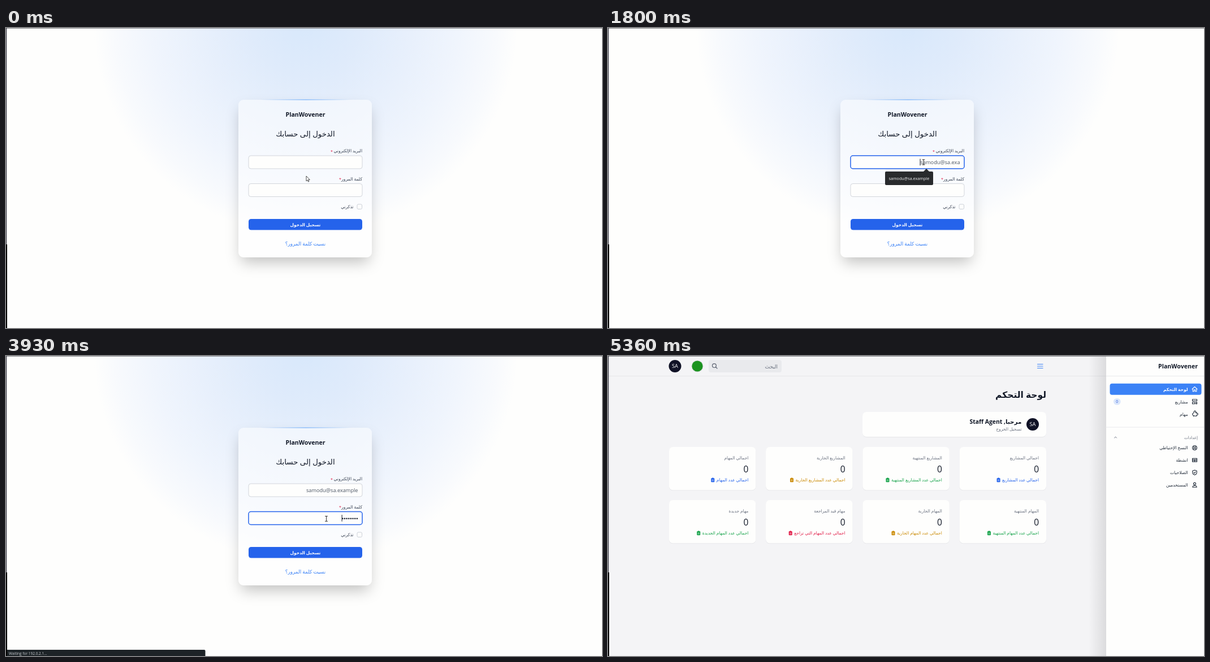
Animation, 1054 px wide and 531 px high, one loop 5.43 s. Source, as an HTML page:

```html
<!DOCTYPE html>
<html lang="ar">
<head>
<meta charset="utf-8">
<title>Sign in</title>
<style>
  html, body { margin: 0; width: 100%; height: 100%; overflow: hidden; background: #fefefd; }
  body {
    position: relative;
    background-image: radial-gradient(circle 375px at 530px -8px,
      #d8e8fb, #dfebfb 25%, #e8f0fc 50%, #f0f5fd 72%, #f8fafd 90%, #fefefd);
  }
  .card {
    position: absolute; left: 411px; top: 127px; width: 236px; height: 279px; border-radius: 9px;
    background: rgba(255, 255, 255, .5); box-shadow: 0 13px 27px -5px rgba(0, 0, 0, .25);
  }
  svg { position: absolute; left: 0; top: 0; display: block; }
  text { font-family: "Open Sans", "DejaVu Sans", sans-serif; white-space: pre; }
  .line { fill: none; stroke-linecap: round; stroke-linejoin: round; }
</style>
</head>
<body>
<div class="card"></div>
<svg id="stage" width="1054" height="531" viewBox="0 0 1054 531">
  <defs>
    <linearGradient id="glow">
      <stop offset="0" stop-color="#60a5fa" stop-opacity="0"/>
      <stop offset=".5" stop-color="#60a5fa"/>
      <stop offset="1" stop-color="#60a5fa" stop-opacity="0"/>
    </linearGradient>
    <linearGradient id="shade">
      <stop offset="0" stop-color="#000" stop-opacity="0"/>
      <stop offset="1" stop-color="#000" stop-opacity=".1"/>
    </linearGradient>
  </defs>
</svg>
<script>
const LOOP = 5430;
const INK = '#111827', GRAY = '#6b7280', BLUE = '#2563eb', SKY = '#3b82f6', WHITE = '#fefefd';
const GREEN = '#16a34a', AMBER = '#ca8a04', RED = '#e11d48';
const BRAND = 'PlanWovener', EMAIL = 'samodu@sa.example';
const stage = document.getElementById('stage');

function add(parent, tag, attrs = {}) {
  const el = document.createElementNS('http://www.w3.org/2000/svg', tag);
  for (const key in attrs) el.setAttribute(key, attrs[key]);
  return parent.appendChild(el);
}
const group = (parent, attrs) => add(parent, 'g', attrs);
const rect = (parent, x, y, width, height, rx, fill, extra) =>
  add(parent, 'rect', { x, y, width, height, rx, fill, ...extra });
const circle = (parent, cx, cy, r, fill) => add(parent, 'circle', { cx, cy, r, fill });
const line = (parent, d, stroke, width = 1, extra) =>
  add(parent, 'path', { d, stroke, 'stroke-width': width, class: 'line', ...extra });

// align is the visual side that x marks: left, middle or right
function text(parent, str, x, y, size, fill, align = 'right', weight = 400) {
  const rtl = /[\u0600-\u06ff]/.test(str);
  const anchor = align === 'middle' ? align : (align === 'right') === rtl ? 'start' : 'end';
  const el = add(parent, 'text', {
    x, y, fill, 'font-size': size, 'font-weight': weight,
    direction: rtl ? 'rtl' : 'ltr', 'text-anchor': anchor
  });
  el.textContent = str;
  return el;
}
const show = (el, on) => el.setAttribute('visibility', on ? 'visible' : 'hidden');
const moveTo = (el, x, y) => el.setAttribute('transform', `translate(${x} ${y})`);

// ---- Login page ----
const login = group(stage);
rect(login, 450, 126.5, 160, 1, 0, 'url(#glow)');
text(login, BRAND, 529.5, 157, 10.6, INK, 'middle', 700);
text(login, 'الدخول إلى حسابك', 529.5, 192, 13.3, INK, 'middle', 500);

function field(label, y, starX) {
  text(login, label, 630, y - 6, 7.6, '#374151', 'right', 500);
  text(login, '*', starX, y - 5.5, 7, RED, 'middle');
  return rect(login, 429, y, 201, 23, 4, WHITE);
}
const emailBox = field('البريد الإلكتروني', 226, 576);
const passBox = field('كلمة المرور', 275.5, 591);
rect(login, 621, 312, 8.5, 8.5, 2, WHITE, { stroke: '#cbd0d8' });
text(login, 'تذكرني', 614.5, 319, 7.6, '#374151', 'right', 500);
rect(login, 429, 338, 201, 19.5, 4.5, BLUE);
text(login, 'تسجيل الدخول', 529.5, 350.5, 7.5, '#fff', 'middle', 700);
text(login, 'نسيت كلمة المرور؟', 529.5, 385, 8.8, SKY, 'middle');

const emailText = text(login, '', 622.5, 241, 9.2, '#4b5563');
const dots = Array.from({ length: 8 }, (_, i) => circle(login, 620.8 - i * 3.63, 287.7, 1.25, INK));
const caret = line(login, 'M0 0V11', INK, 1);

const popup = group(login);
const popupBox = rect(popup, 483, 254, 92, 63.5, 2, '#292b2d');
add(popup, 'path', { d: 'M557.5 254.5L563 249L568.5 254.5Z', fill: '#292b2d' });
const choices = [EMAIL, 'salor@ketun.example', 'sabu47@nim.example',
  'hala@vorim.example', 'nura52@tel.example', 'info@ketun.example']
  .map((mail, i) => text(popup, mail, 0, 269 + i * 19.7, 7.2, '#f3f4f6', 'left'));

const status = group(login);
rect(status, 0, 520, 352.5, 13, 2, '#1d2327');
text(status, 'Waiting for 192.0.2.1...', 5, 528.6, 6.5, '#c9cdd1', 'left');

const arrow = group(login);
add(arrow, 'path', {
  d: 'M0 0V9L2.1 7.1L3.5 10.2L4.9 9.6L3.5 6.6H6.3Z',
  fill: '#fff', stroke: '#222', 'stroke-width': .8
});
const beam = group(login);
line(beam, 'M-2 -4.5H2M0 -4.5V4.5M-2 4.5H2', '#333', 1);

// ---- Dashboard ----
const board = group(stage);
rect(board, 0, 0, 1054, 531, 0, '#f4f4f6');
line(board, 'M0 35.5H881', '#e6e7ea', 1);
rect(board, 850, 0, 31, 531, 0, 'url(#shade)');
rect(board, 881, 0, 173, 531, 0, WHITE);
line(board, 'M881 35.5H1054M881 126H1054', '#e8e9ec', 1);
text(board, BRAND, 1043, 22, 10.6, INK, 'right', 700);

function avatar(x, y) {
  circle(board, x, y, 11, '#101226');
  text(board, 'SA', x, y + 3.4, 9.2, '#fff', 'middle');
}
avatar(118.5, 18);
circle(board, 158, 18, 10.5, '#d9dbdf');
circle(board, 158, 18, 9.6, '#1c9320');
rect(board, 178, 7, 129, 22, 4, '#e9eaed');
line(board, 'M190.4 19.4L193 22M191.3 17.1a3.4 3.4 0 1 1-6.8 0a3.4 3.4 0 1 1 6.8 0', '#5b6270', 1.2);
text(board, 'البحث', 300, 21.5, 9, GRAY);
line(board, 'M759.5 14.5H769M759.5 18H769M759.5 21.5H769', SKY, 1.2);

const icons = {
  home: 'M-4.5 0L0 -4.2L4.5 0M-3.3 -1V4H-1V1H1V4H3.3V-1',
  boxes: 'M-4 -4H4V-1.2H-4ZM-4 1H0V4H-4ZM2 1H4V4H2Z',
  puzzle: 'M-4 0L-1 -3A1.6 1.6 0 1 1 1.3 -2.6L3.5 -3V-1A1.5 1.5 0 1 1 3.5 1.5V3.6H1L-1 3L-2 4Z',
  ring: 'M4 0A4 4 0 1 1 -4 0A4 4 0 1 1 4 0M1.7 0A1.7 1.7 0 1 1 -1.7 0A1.7 1.7 0 1 1 1.7 0M-2.8 -2.8L-1.2 -1.2M2.8 -2.8L1.2 -1.2M-2.8 2.8L-1.2 1.2M2.8 2.8L1.2 1.2',
  table: 'M-4 -3H4V3H-4ZM-4 -1H4M-4 1H4M0 -1V3',
  shield: 'M0 -4.3L3.7 -3V0C3.7 2 2 3.6 0 4.3C-2 3.6 -3.7 2 -3.7 0V-3ZM-1.6 0L-.4 1.2L1.7 -1.2',
  user: 'M2 -2.2A2 2 0 1 1 -2 -2.2A2 2 0 1 1 2 -2.2M-3.6 4C-3.6 0 3.6 0 3.6 4Z'
};
function navItem(icon, label, y, active) {
  const color = active ? '#fff' : '#1f2937';
  if (active) rect(board, 887.5, y - 10, 162, 20, 4, SKY);
  line(board, icons[icon], color, 1.1, { transform: `translate(1037.5 ${y})` });
  text(board, label, 1025.5, y + 2.8, 7.5, color, 'right', active ? 700 : 500);
}
navItem('home', 'لوحة التحكم', 58.7, true);
navItem('boxes', 'مشاريع', 80.7);
navItem('puzzle', 'مهام', 102.7);
navItem('ring', 'النسخ الإحتياطي', 162.5);
navItem('table', 'انشطة', 184.3);
navItem('shield', 'الصلاحيات', 206.3);
navItem('user', 'المستخدمين', 228.3);
rect(board, 894, 75, 12.5, 11.5, 5.5, '#dbe7fb');
text(board, '0', 900.2, 83.3, 6.5, '#1d4ed8', 'middle');
text(board, 'إعدادات', 1043, 147, 7.2, GRAY);
line(board, 'M895.5 145L897.5 143L899.5 145', GRAY, 1);

function panel(x, y, width, height) {
  rect(board, x, y + .8, width, height, 7, '#e1e2e5');
  rect(board, x, y, width, height, 7, WHITE);
}
text(board, 'لوحة التحكم', 775, 74, 15.5, INK, 'right', 700);
panel(450, 99, 325, 44);
avatar(751, 121);
text(board, 'مرحبا, Staff Agent', 731.5, 120, 10.4, INK, 'right', 700);
text(board, 'تسجيل الخروج', 731.5, 132, 7.5, GRAY);

const stats = [
  ['اجمالي المشاريع', 'المشاريع', BLUE],
  ['المشاريع المنتهية', 'المشاريع المنتهية', GREEN],
  ['المشاريع الجارية', 'المشاريع الجارية', AMBER],
  ['اجمالي المهام', 'المهام', BLUE],
  ['المهام المنتهية', 'المهام المنتهية', GREEN],
  ['المهام الجارية', 'المهام الجارية', AMBER],
  ['مهام قيد المراجعة', 'المهام التي تراجع', RED],
  ['مهام جديدة', 'المهام الجديدة', GREEN]
];
stats.forEach(([title, detail, color], i) => {
  const x = 621.5 - (i % 4) * 171.2, y = i < 4 ? 161 : 255, right = x + 140.5;
  panel(x, y, 153.5, 76.5);
  text(board, title, right, y + 21.5, 7.5, GRAY);
  text(board, '0', right, y + 45, 15.5, INK);
  const note = text(board, 'اجمالي عدد ' + detail, right, y + 61, 7.5, color);
  const clip = group(board);
  moveTo(clip, right - note.getComputedTextLength() - 9.5, y + 54.5);
  rect(clip, 0, .8, 6, 7, 1, color);
  rect(clip, 1.6, 0, 2.8, 1.6, .6, color);
  line(clip, 'M1.8 3.6H4.2M1.8 5.4H4.2', '#fff', .6);
});

// Window edge, always on top
rect(stage, 0, 0, 1054, 1, 0, '#85868a');
rect(stage, 0, 0, 1.2, 383, 0, '#3c3d48');
rect(stage, 0, 383, 2, 148, 0, '#000');

// ---- Timeline ----
const keyTimes = [360, 430, 560, 660, 800, 880, 960, 1060, 1130, 1430, 1700, 1750, 1800, 1960, 2020, 2080, 2140];
const dotTime = i => 2630 + i * 66;
const path = [[0, 531, 262], [100, 531, 262], [260, 558, 237.5], [2170, 558, 237.5], [2320, 557, 282],
  [2400, 557, 282], [2500, 566.5, 288], [4300, 566.5, 288], [4420, 520, 305], [4660, 34, 449]];

function pointer(t) {
  const next = path.findIndex(p => p[0] > t);
  if (next < 0) return path[path.length - 1].slice(1);
  const [t0, x0, y0] = path[next - 1], [t1, x1, y1] = path[next];
  const u = (t - t0) / (t1 - t0), k = u * u * (3 - 2 * u);
  return [x0 + (x1 - x0) * k, y0 + (y1 - y0) * k];
}
function setFocus(box, on) {
  box.setAttribute('stroke', on ? BLUE : '#d3d6dc');
  box.setAttribute('stroke-width', on ? 1.5 : 1);
}

function render(t) {
  const home = t >= 5160;
  board.style.display = home ? '' : 'none';
  login.style.display = home ? 'none' : '';
  if (home) return;

  const inEmail = t >= 220 && t < 2430, inPass = t >= 2430;
  setFocus(emailBox, inEmail);
  setFocus(passBox, inPass);

  const typed = keyTimes.filter(k => t >= k).length;
  emailText.textContent = EMAIL.slice(0, typed);
  const dotCount = dots.filter((dot, i) => {
    show(dot, t >= dotTime(i));
    return t >= dotTime(i);
  }).length;

  const caretOff = (t >= 1130 && t < 1260) || (t >= 2250 && t < 2430) || (t >= 3150 && t < 3900);
  show(caret, (inEmail || inPass) && !caretOff);
  if (inPass) moveTo(caret, 622.5 - dotCount * 3.55, 281.5);
  else moveTo(caret, 622 - (typed ? emailText.getComputedTextLength() : 0), 232);

  const rows = typed < 2 ? 6 : typed < 3 ? 3 : 1, left = rows > 1 ? 483 : 490;
  popup.style.display = t >= 260 && t < 2200 ? '' : 'none';
  popupBox.setAttribute('x', left);
  popupBox.setAttribute('width', 575 - left);
  popupBox.setAttribute('height', 4.2 + rows * 19.8);
  choices.forEach((choice, i) => {
    choice.setAttribute('x', left + 6.5);
    choice.style.display = i < rows ? '' : 'none';
  });

  const [x, y] = pointer(t);
  const overField = (t >= 220 && t < 2190) || (t >= 2430 && t < 4380);
  show(beam, overField);
  show(arrow, !overField && t < 4680);
  moveTo(beam, x, y);
  moveTo(arrow, x, y);
  show(status, t >= 3900);
}

const start = performance.now();
function tick() {
  render((performance.now() - start) % LOOP);
  requestAnimationFrame(tick);
}
tick();
</script>
</body>
</html>
```
